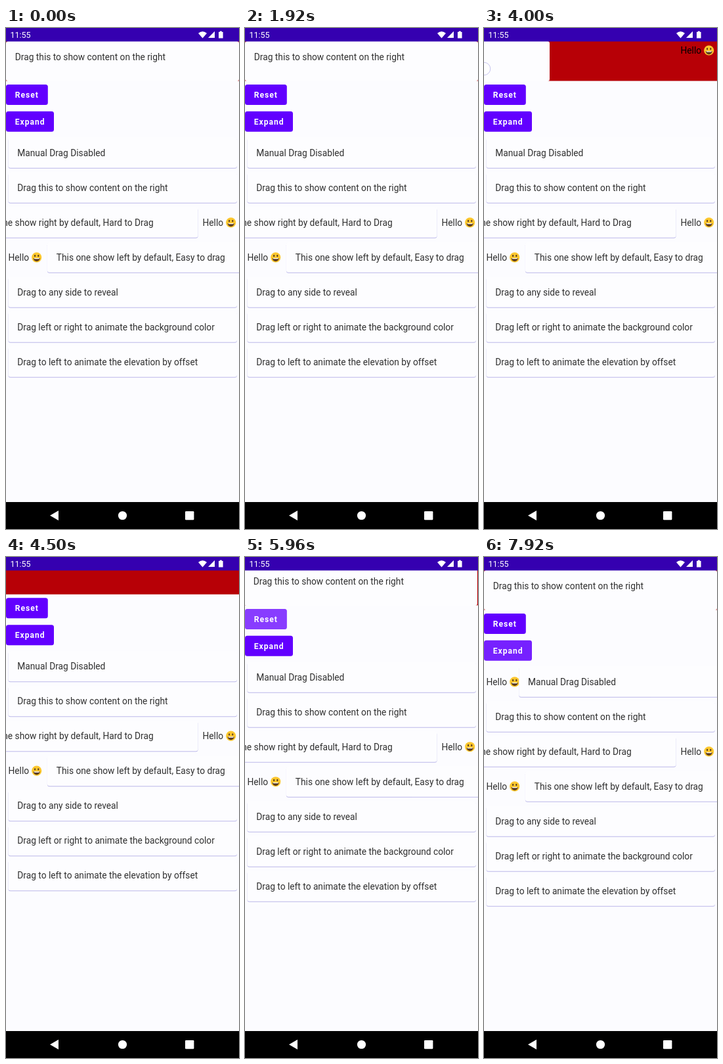
Animation of 355x762 px, one loop 8 s. Source, as an HTML page:

```html
<!DOCTYPE html>
<html lang="en">
<head>
<meta charset="utf-8">
<title>Swipe to reveal</title>
<style>
html, body { margin: 0; width: 100%; height: 100%; overflow: hidden; background: #fcfcff; }
svg { display: block; width: 355px; height: 762px; }
text { font: 13.75px Roboto, sans-serif; fill: var(--ink, #303030); white-space: pre; }
.card { fill: #fdfdff; filter: drop-shadow(0 1.2px .7px #5a50c866); }
.button rect { fill: #6200ff; }
.button .ripple { fill: #fff; opacity: 0; }
.button text { font-size: 12.1px; font-weight: 600; letter-spacing: 1px; fill: #fff; }
.clock { font-size: 12.5px; fill: #fff; }
#headerHello { --ink: #000; }
</style>
</head>
<body>
<svg id="stage" viewBox="0 0 355 762">
  <defs>
    <g id="hello">
      <text y="4.8">Hello</text>
      <circle cx="43.2" cy="0" r="7.6" fill="#fcc72e"/>
      <ellipse cx="40.6" cy="-2.3" rx="1.1" ry="1.7" fill="#5b3a1c"/>
      <ellipse cx="45.8" cy="-2.3" rx="1.1" ry="1.7" fill="#5b3a1c"/>
      <path d="M38.2 1.2h10a5 5 0 0 1-10 0z" fill="#5b3a1c"/>
      <path d="M39 1.2h8.4l-.6 1.3h-7.2z" fill="#fff"/>
    </g>
  </defs>
  <rect width="355" height="762" fill="#fcfcff"/>
  <g id="list"></g>
  <g id="header">
    <rect y="20" width="355" height="60.5" fill="#b70006"/>
    <use id="headerHello" href="#hello" x="299.5" y="34"/>
    <g id="headerCard">
      <rect y="20" width="355" height="61" rx="3.5" fill="#fdfdff"/>
      <text x="13.8" y="48.8">Drag this to show content on the right</text>
    </g>
  </g>
  <circle id="pointer" cy="62" r="9.7" fill="#fff" fill-opacity=".6" stroke="#c6c3ee"/>
  <rect width="355" height="20.5" fill="#3500b0"/>
  <text class="clock" x="6.5" y="15.3">11:55</text>
  <g fill="#fff">
    <path d="M293 8q6.5-5.4 13 0l-6.5 7.4z"/>
    <path d="M318 5v10h-10z"/>
    <path d="M324 6h1.8V4.8h3V6h1.8v9.4H324z"/>
  </g>
  <rect y="721" width="355" height="41" fill="#000"/>
  <g fill="#fff">
    <path d="M67 741.5l13-7.5v15z"/>
    <circle cx="177.5" cy="741.5" r="6.6"/>
    <rect x="273" y="735" width="13.4" height="13.2" rx="1.2"/>
  </g>
</svg>
<script>
const LOOP = 8000, REVEAL = 59.5, COLLAPSE = 58;
const $ = id => document.getElementById(id);
const list = $('list');

// label, resting offset, x of the revealed greeting
const rows = [
  ['Manual Drag Disabled', 0, 3.5],
  ['Drag this to show content on the right', 0],
  ['This one show right by default, Hard to Drag', -REVEAL, 299.5],
  ['This one show left by default, Easy to drag', REVEAL, 3.5],
  ['Drag to any side to reveal', 0],
  ['Drag left or right to animate the background color', 0],
  ['Drag to left to animate the elevation by offset', 0]
];

const button = (id, label, y, w) => `<g class="button">
  <rect y="${y}" width="${w}" height="31" rx="3.5"/>
  <rect class="ripple" id="${id}" y="${y}" width="${w}" height="31" rx="3.5"/>
  <text x="13.8" y="${y + 20}">${label}</text></g>`;

const row = ([label, offset, helloX], i) => {
  const y = 166.8 + 53 * i;
  const hello = helloX ? `<use href="#hello" x="${helloX}" y="${y + 23}"/>` : '';
  return `${hello}<g id="row${i}" transform="translate(${offset})">
    <rect class="card" x="3.4" y="${y}" width="348.6" height="46" rx="3.5"/>
    <text x="17.3" y="${y + 28}">${label}</text></g>`;
};

list.innerHTML = button('resetRipple', 'Reset', 86, 63.8) +
  button('expandRipple', 'Expand', 126.8, 73) + rows.map(row).join('');

const ramp = (t, a, b) => Math.min(1, Math.max(0, (t - a) / (b - a)));

// critically damped spring from 0 to 1
const spring = (t, start, speed) => {
  const z = Math.max(0, t - start) * speed;
  return 1 - (1 + z) * Math.exp(-z);
};

const move = (id, x, y = 0) => $(id).setAttribute('transform', `translate(${x} ${y})`);
const show = (id, on) => $(id).style.display = on ? '' : 'none';

function draw(t) {
  const drag = 255 * ramp(t, 2986, 4000);
  const fling = 100 * spring(t, 4000, .022);
  const swipe = (drag + fling) * (1 - spring(t, 5460, .016));
  const collapse = spring(t, 4400, .014) * (1 - spring(t, 5700, .014));

  move('headerCard', -swipe);
  move('header', 0, -COLLAPSE * collapse);
  show('header', collapse < .98);
  $('headerHello').style.opacity = Math.min(1, swipe / 100);
  move('list', 0, -COLLAPSE * collapse);
  move('row0', REVEAL * spring(t, 7648, .012));

  $('pointer').setAttribute('cx', Math.min(248, 209 - (t - 3130) * .2402));
  show('pointer', t >= 2880 && t < 4050);
  $('resetRipple').style.opacity = .24 * (ramp(t, 5440, 5560) - ramp(t, 6200, 6630));
  $('expandRipple').style.opacity = .13 * ramp(t, 7400, 7560);
}

let start;
function tick(now) {
  start ??= now;
  draw((now - start) % LOOP);
  requestAnimationFrame(tick);
}
draw(0);
requestAnimationFrame(tick);
</script>
</body>
</html>
```
